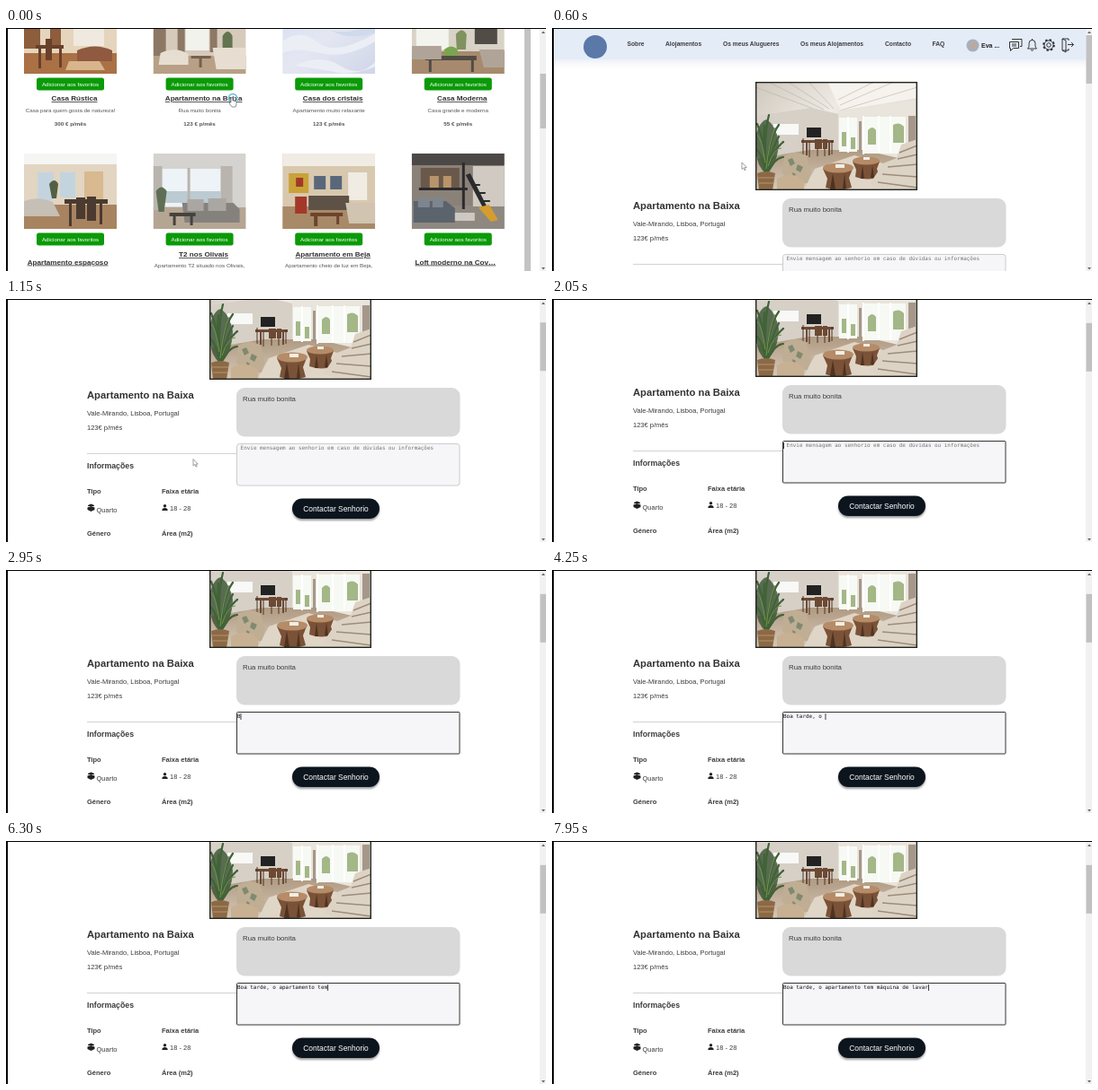
An HTML page that plays this animation: 600x271 px, repeating every 8000 ms.

```html
<!DOCTYPE html>
<html lang="pt">
<head>
<meta charset="utf-8">
<title>Alojamentos</title>
<style>
html, body { margin: 0; width: 100%; height: 100%; overflow: hidden; background: #fff; }
svg { display: block; }
text { font-family: "Liberation Sans", Arial, sans-serif; font-size: 7.5px; fill: #3c3c3c; }
.b { font-weight: bold; }
.mid { text-anchor: middle; }
.title { font-size: 8.125px; font-weight: bold; text-decoration: underline; fill: #333; }
.small { font-size: 6.25px; fill: #555; }
.nav text { font-size: 6.7px; font-weight: bold; }
.mono { font-family: "DejaVu Sans Mono", monospace; font-size: 5.95px; }
.icon { fill: none; stroke: #222; stroke-width: .9; stroke-linejoin: round; }
</style>
</head>
<body>
<svg width="600" height="271" viewBox="0 0 600 271">
<defs>
  <clipPath id="frame"><rect width="103" height="84"/></clipPath>
  <clipPath id="heroClip"><rect x="226" y="60" width="180" height="121"/></clipPath>
  <linearGradient id="clouds" x2="1" y2="1">
    <stop stop-color="#d5dff0"/><stop offset=".5" stop-color="#e4e7f2"/><stop offset="1" stop-color="#d0d6e8"/>
  </linearGradient>
  <linearGradient id="ceiling" x2="1" y2=".6">
    <stop stop-color="#cfc8be"/><stop offset=".45" stop-color="#eeeae4"/><stop offset="1" stop-color="#dedad3"/>
  </linearGradient>
  <linearGradient id="floor" x2="0" y2="1"><stop stop-color="#b09a82"/><stop offset="1" stop-color="#d5c9b9"/></linearGradient>
  <linearGradient id="fade" x2="0" y2="1"><stop stop-color="#e9eef6"/><stop offset=".5" stop-color="#f8f9fc"/><stop offset="1" stop-color="#fff"/></linearGradient>
  <radialGradient id="face"><stop stop-color="#c9a48e"/><stop offset="1" stop-color="#9fb3c4"/></radialGradient>
  <filter id="soft"><feGaussianBlur stdDeviation="1.3"/></filter>
</defs>
<rect width="600" height="271" fill="#fff"/>

<g id="listing">
  <g id="cards"></g>
  <rect x="576" width="7" height="271" fill="#c3c3c3"/>
</g>

<g id="detail">
  <rect y="34" width="593" height="12" fill="url(#fade)"/>
  <rect width="593" height="35" fill="#e4ecf8"/>
  <circle cx="48" cy="21" r="13" fill="#5a78a8"/>
  <g class="nav" id="nav"></g>
  <circle cx="467.500" cy="19.500" r="7" fill="url(#face)"/>
  <text x="477" y="21.500" class="b" style="font-size:7px;fill:#222">Eva ...</text>
  <g class="icon">
    <path d="M511 12.500h11v8h-2M508.500 15.500h10v7h-6l-3 3v-3h-1zM511 18h5M511 20h5"/>
    <path d="M528.500 23c2-2 1.500-4 1.500-6a3.500 3.500 0 0 1 7 0c0 2-.5 4 1.500 6zM532 24.500q1.500 1.500 3 0M533.500 13.500v-1.500"/>
    <circle cx="552" cy="19" r="5"/><circle cx="552" cy="19" r="2.300"/>
    <circle cx="552" cy="19" r="6" stroke-dasharray="2.350" stroke-width="1.600"/>
    <path d="M574 14v-2h-7v13h7v-2M567 12l4 2v13l-4-2M573 18.500h6.500m-2.500-2.500l2.500 2.500l-2.500 2.500"/>
  </g>

  <g clip-path="url(#heroClip)">
    <path fill="url(#ceiling)" d="M226 60h180v121H226z"/>
    <path fill="#f6f3ee" d="M306 60l15 32 85-14V60z"/>
    <path fill="none" stroke="#b9b1a6" stroke-width=".6" d="M226 66l70 26M240 60l62 31M262 60l46 30M285 60l28 30M320 92l86-26M320 86l60-26M318 80l40-20"/>
    <path fill="#d6d0c7" d="M226 98l62-9 35 8v48h-97z"/>
    <path fill="#e9e4dc" d="M318 92l88-12v70h-88z"/>
    <path fill="url(#floor)" d="M226 146l60-10h60l60 14v31H226z"/>
    <path fill="#f7f9f4" d="M319 100h20v38h-20zM347 99h46v41h-46z"/>
    <path fill="#a3b787" d="M322 116h5v16h-5zM332 122h5v13h-5zM351 114q5-6 9 0v16h-9zM379 108q7-4 12 2v18h-12z"/>
    <path fill="none" stroke="#fff" stroke-width="2" d="M329 99v40M346 98v43M363 98v42M376 98v42"/>
    <path fill="#a5988a" d="M396 98h8v50h-8zM341 104h3v35h-3z"/>
    <path fill="#f8f8f7" d="M246 107h28v12h-28z"/>
    <path fill="#222" d="M283 111h16v11h-16z"/>
    <path fill="#6d4933" d="M277 125h36v3h-36zM282 128h2v14h-2zM307 128h2v14h-2zM292 124h8v11h-8zM301 124h5v11h-5z"/>
    <path fill="none" stroke="#4b3425" d="M279 123v20m7-16v17m9-10v9m8-9v9m8-18v16"/>
    <path fill="#e0d6c7" d="M292 157l44-15 57 16-22 23h-92z"/>
    <path fill="#bfae94" d="M258 143q13-8 25 0l5 19-4 11h-19l-9-11z"/>
    <path fill="#7f8a70" d="M262 147l5-2 3 6-5 3zM273 152l6 3-3 6-5-3zM267 161l4 2-3 5z"/>
    <path fill="#c8b093" d="M250 168q18-10 30 3v10h-30z"/>
    <path fill="#7a5237" d="M301 157h33l-4 10 3 11q-15 5-29 0l2-10zM334 149h30l-3 8 3 9q-13 5-27 0l1-8z"/>
    <path fill="#4e3322" d="M312 162l3 18h-6zM325 162l2 17h-4zM345 153l2 15h-4zM356 153l2 14h-4z"/>
    <g fill="#b58c67"><ellipse cx="318" cy="156" rx="17" ry="5.500"/><ellipse cx="349" cy="148" rx="15" ry="4.500"/></g>
    <path fill="#f2eee6" d="M315 152h10v4h-10zM346 144h7v3h-7z"/>
    <path fill="#ddd3c5" d="M368 151l15-6 5-15 18-6v57h-35l-18-7z"/>
    <path fill="none" stroke="#9c8c7b" stroke-width="1.400" d="M386 139l20-8M384 146l22-5M373 155l33-3M367 163l39 3M362 172l44 6"/>
    <path fill="#2f4a2a" opacity=".75" d="M238 163q-14-12-12-42 5-18 13-19 10 8 13 25-1 25-14 36z"/>
    <path fill="none" stroke="#3f6337" stroke-width="2.200" stroke-linecap="round" d="M238 163q-1-34-10-56M238 163q-3-43 3-66M239 163q0-37 13-55M239 160q6-24 18-33M237 160q-4-22-11-25M239 162q9-18 18-18M238 155q-4-25-2-46M238 159q8-27 14-38"/>
    <path fill="none" stroke="#76934d" d="M238 157q3-30 10-46M237 150q-4-27-9-31M240 154q7-21 15-20"/>
    <path fill="#8c6945" d="M228 162q10-4 20 0l-3 19h-15z"/>
    <path fill="none" stroke="#b4946d" d="M229 167h18M230 173h16"/>
  </g>
  <rect x="226.700" y="60.700" width="178.600" height="119.600" fill="none" stroke="#20241d" stroke-width="1.400"/>

  <text x="90" y="202" class="b" style="font-size:11.25px;fill:#333">Apartamento na Baixa</text>
  <text x="90" y="220.700">Vale-Mirando, Lisboa, Portugal</text>
  <text x="90" y="237">123€ p/mês</text>
  <rect x="90" y="263" width="166" height="1" fill="#d2d2d2"/>
  <text x="90" y="280" class="b" style="font-size:8.75px">Informações</text>
  <g class="b">
    <text x="90" y="308">Tipo</text><text x="173" y="308">Faixa etária</text>
    <text x="90" y="354.500">Género</text><text x="173" y="354.500">Área (m2)</text>
  </g>
  <path fill="#222" d="M90.500 323.500l4-1.500 4 1.500v2.500l-4 2-4-2zM91 321l3.500-1.500 3.500 1.500v1h-7z"/>
  <text x="100.500" y="328.700">Quarto</text>
  <circle cx="176.500" cy="321.700" r="1.700" fill="#222"/><path fill="#222" d="M173.300 327q0-3 3.200-3t3.200 3z"/>
  <text x="182" y="327">18 - 28</text>

  <rect x="256" y="190" width="248.500" height="54.500" rx="9" fill="#d9d9d9"/>
  <text x="263" y="204.700" style="font-size:7.8px">Rua muito bonita</text>
  <rect id="field" x="256.500" y="252.500" width="247.500" height="46.500" fill="#f6f5f8"/>
  <text id="placeholder" x="260.600" y="259.300" class="mono" style="fill:#757575">Envie mensagem ao senhorio em caso de dúvidas ou informações</text>
  <text id="typed" x="257" y="259.300" class="mono" style="fill:#111"></text>
  <rect id="caret" y="254" width=".8" height="7" fill="#111"/>
  <rect x="318" y="315" width="97" height="23" rx="11.500" fill="#0006" filter="url(#soft)"/>
  <rect x="318" y="313.500" width="97" height="22.500" rx="11.200" fill="#0c151e"/>
  <text x="366.500" y="327.800" class="mid" style="font-size:8.44px;fill:#fff">Contactar Senhorio</text>
</g>

<rect x="593" width="7" height="271" fill="#f1f1f1"/>
<rect id="thumb" x="593.500" width="6.500" fill="#c1c1c1"/>
<path fill="#666" d="M595 6h4l-2-2.500zM595 267h4l-2 2.500z"/>
<path d="M0 0h600v1H2v270H0z"/>

<g id="hand">
  <circle cx="1" cy="0" r="4.500" fill="none" stroke="#62b9dc" stroke-width="1.500"/>
  <path fill="#fff" stroke="#666" stroke-width=".7" d="M-1 5V0q1-1.500 2 0v3l4 1v3l-1 3H0l-3-4q0-1.500 2-1z"/>
</g>
<path id="arrow" fill="#fff" stroke="#777" stroke-width=".7" d="M0 0v7.500l1.700-1.500 1.300 2.700 1.200-.6-1.300-2.500h2.400z"/>
</svg>

<script>
const $ = id => document.getElementById(id);
const show = (id, on) => $(id).style.display = on ? '' : 'none';
const LOOP = 8000, OPEN = 300, FOCUS = 1600, TYPE = 2800;
const MESSAGE = 'Boa tarde, o apartamento tem máquina de lavar';

const fill = (color, d) => `<path fill="${color}" d="${d}"/>`;
const room = (wall, floor, horizon, ...shapes) =>
  fill(wall, 'M0 0h103v84H0z') + fill(floor, `M0 ${horizon}h103v84H0z`) + shapes.map(s => fill(...s)).join('');

const photos = [
  room('#e5d5bd', '#aa7145', 61,
    ['#8d5d3c', 'M0 34h18v22H0zM29 33h12v20H29z'], ['#f0e9df', 'M55 33h34v20H55z'],
    ['#69402a', 'M13 52h31v4H13zM16 56h3v22h-3zM39 56h3v21h-3zM24 45h7v24h-7z'],
    ['#8f5a3f', 'M59 58q20-9 39 0v12H59z'], ['#d7b58d', 'M50 70h34l6 10H46z']),
  room('#d6cabb', '#b8a086', 64,
    ['#f2f2ed', 'M36 33h26v25H36z'], ['#8c7865', 'M0 33h14v31H0zM27 33h8v28h-8zM63 33h8v27h-8z'],
    ['#e7ded1', 'M8 61q17-8 31 1v12H6zM66 55h37v24H70z'], ['#76604e', 'M42 64h22v3H42zM51 67h3v10h-3z'],
    ['#637451', 'M77 42q6-10 11 0v13H77z']),
  fill('url(#clouds)', 'M0 0h103v84H0z') +
    fill('#eceef6', 'M0 48q20-15 39 1t64-10v9q-34 20-61 13T0 61zM14 75q28-14 50 0t39-4v5q-30 12-50 5z') +
    fill('#cfdaec', 'M54 36q20 4 49-6v8q-25 10-49-2z'),
  room('#d9d2c7', '#a78a6d', 59,
    ['#f3f4ee', 'M5 33h36v24H5z'], ['#80935f', 'M49 40q7-9 12 0l-1 17H50z'],
    ['#514c46', 'M70 33h25v18H70zM15 64h57v5H15zM19 69h3v13h-3zM66 69h3v13h-3z'],
    ['#b0a498', 'M0 53h33v15H0zM75 57h28v20H80z'], ['#7ba44e', 'M36 57q8-7 15 0v7H36z']),
  room('#e2d5c1', '#a88360', 57,
    ['#f5f6f4', 'M0 0h103v12H0z'], ['#c3d4df', 'M15 21h18v31H15zM40 21h17v28H40z'],
    ['#d8b990', 'M67 20h21v33H67z'], ['#c6bfb5', 'M0 53q16-6 32 1l8 16H0z'],
    ['#4a3a30', 'M45 51h48v5H45zM50 56h3v25h-3zM84 56h3v23h-3zM58 49h10v24H58zM70 48h10v27H70z'],
    ['#536044', 'M28 34q6-8 10 0l-2 16h-5z']),
  room('#d5d3cf', '#b5a693', 60,
    ['#edf3f6', 'M8 17h67v42H8z'], ['#bccad2', 'M8 42h67v13H8z'],
    ['#b9b4ae', 'M0 14h10v49H0zM75 14h13v49H75zM38 16h3v43h-3z'],
    ['#85827e', 'M32 55h57l7 7v15H35z'], ['#aaa7a3', 'M38 51h18v13H38zM61 50h20v14H61z'],
    ['#47423e', 'M18 66h29v4H18zM22 70h3v10h-3zM41 70h3v10h-3z'], ['#5f6f55', 'M3 42q6-9 12 0l-3 23H6z']),
  room('#d8c8af', '#a88a69', 59,
    ['#f0ece3', 'M0 0h103v14H0zM73 21h21v31H73z'], ['#c9a238', 'M7 22h22v22H7z'],
    ['#a33829', 'M15 27h8v10h-8zM14 48h13v19H14z'], ['#59677b', 'M35 25h13v15H35zM53 25h13v15H53z'],
    ['#5e5146', 'M29 47h45v16H29z'], ['#d1c4b0', 'M70 55h33v23H74z'], ['#6c432d', 'M31 66h36v4H31zM35 70h4v11h-4zM60 70h3v9h-3z']),
  room('#8a8178', '#8f8881', 58,
    ['#4c4845', 'M0 0h103v13H0z'], ['#d0cac2', 'M68 14h35v45H68z'], ['#6a594a', 'M10 16h43v22H10z'],
    ['#b9946a', 'M20 25h10v13H20zM35 25h9v13h-9z'],
    ['#2b2b2e', 'M8 38h54v3H8zM56 10h3v52h-3zM60 24l5-2 22 44h-5zM68 34h8v2h-8zM73 43h9v2h-9zM78 52h9v2h-9z'],
    ['#5b636d', 'M2 53h36l10 8v16H2z'], ['#7d858e', 'M7 49h13v11H7zM23 49h12v11H23z'],
    ['#d59d2e', 'M74 60l12-3 10 17-8 2-7-8z'], ['#cdc8c1', 'M48 66h22v9H48z']),
];

const cards = [
  ['Casa Rústica', 'Casa para quem gosta de natureza!', '300'],
  ['Apartamento na Baixa', 'Rua muito bonita', '123'],
  ['Casa dos cristais', 'Apartamento muito relaxante', '123'],
  ['Casa Moderna', 'Casa grande e moderna', '55'],
  ['Apartamento espaçoso'],
  ['T2 nos Olivais', 'Apartamento T2 situado nos Olivais,'],
  ['Apartamento em Beja', 'Apartamento cheio de luz em Beja,'],
  ['Loft moderno na Cov…'],
];

const label = (cls, x, y, words) => `<text class="mid ${cls}" x="${x}" y="${y}">${words}</text>`;

$('cards').innerHTML = cards.map(([name, about, price], i) => {
  const titleX = about ? 56 : 48.5;
  const titleY = price ? 114 : about ? 115 : 123.5;
  return `<g transform="translate(${20 + i % 4 * 143.6} ${i < 4 ? -33 : 140})">
    <g clip-path="url(#frame)">${photos[i]}</g>
    <rect x="14" y="88.500" width="75" height="14" rx="2.500" fill="#0b9a08"/>
    <text class="mid small" x="51.500" y="97.700" style="fill:#fff">Adicionar aos favoritos</text>
    ${label('title', titleX, titleY, name)}
    ${about ? label('small', 51.5, price ? 126.7 : 127.3, about) : ''}
    ${price ? label('small b', 51.5, 142, price + ' € p/mês') : ''}</g>`;
}).join('');

$('nav').innerHTML = Object.entries({
  Sobre: 83.5, Alojamentos: 126, 'Os meus Alugueres': 190, 'Os meus Alojamentos': 276, Contacto: 370, FAQ: 422.5,
}).map(([word, x]) => `<text x="${x}" y="19.700">${word}</text>`).join('');

const smooth = p => p * p * (3 - 2 * p);
const easeOut = p => 1 - (1 - p) ** 3;
const linear = p => p;

// Interpolates between [time, value] keys.
function track(t, keys, ease = smooth) {
  let [t0, v0] = keys[0];
  for (const [t1, v1] of keys) {
    if (t < t1) return t <= t0 ? v0 : v0 + (v1 - v0) * ease((t - t0) / (t1 - t0));
    [t0, v0] = [t1, v1];
  }
  return v0;
}

function draw() {
  const t = performance.now() % LOOP;
  const opened = t >= OPEN, focused = t >= FOCUS, typing = t >= TYPE;
  show('listing', !opened);
  show('detail', opened);

  const scroll = track(t, [[850, 0], [1290, 94]], easeOut);
  $('detail').setAttribute('transform', `translate(0 ${-Math.round(scroll)})`);
  $('thumb').setAttribute('y', opened ? 8 + scroll * .2 : 51);
  $('thumb').setAttribute('height', opened ? 54 : 61);

  const x = track(t, [[100, 251], [550, 211], [1150, 208], [1250, 208], [1500, 290]]);
  const y = track(t, [[100, 78], [550, 150], [850, 150], [1150, 178.5], [1250, 178.5], [1500, 180]]);
  for (const id of ['hand', 'arrow']) $(id).setAttribute('transform', `translate(${x} ${y})`);
  show('hand', !opened);
  show('arrow', opened && x < 256);

  const count = Math.floor(track(t, [[TYPE, 0], [4200, 13], [6250, 28], [7900, 45]], linear));
  $('typed').textContent = MESSAGE.slice(0, count);
  show('placeholder', count === 0);
  $('field').setAttribute('stroke', focused ? '#333' : '#ccc');
  $('field').setAttribute('rx', focused ? 1 : 3);
  $('caret').setAttribute('x', 257 + count * 3.582);
  show('caret', typing || focused && (t - FOCUS) % 1060 < 530);
  requestAnimationFrame(draw);
}
draw();
</script>
</body>
</html>
```
